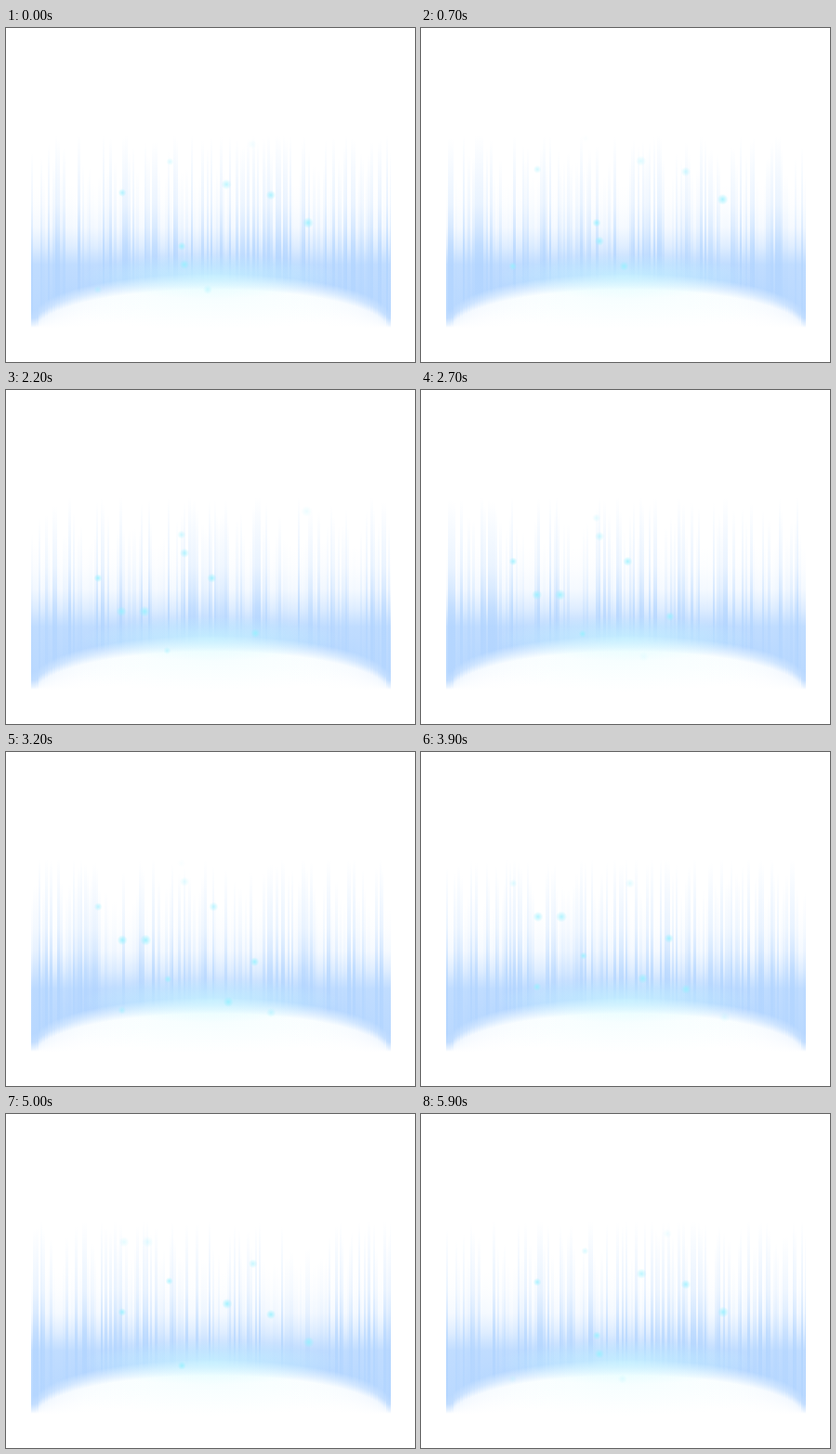
An HTML page with a canvas for the animation above (6 s loop, 440 by 360 pixels).

```html
<!DOCTYPE html>
<html lang="en">
<head>
<meta charset="utf-8">
<title>Light curtain</title>
<style>
  html, body { margin: 0; width: 100%; height: 100%; overflow: hidden; background: #fff; }
  canvas { display: block; }
</style>
</head>
<body>
<canvas id="stage" width="440" height="360"></canvas>
<script>
const ctx = document.getElementById('stage').getContext('2d');
const LOOP = 6, LEFT = 27, RIGHT = 414, MID = 220.5, BASE = 323, TAU = Math.PI * 2;
const CLIMB = 36, START_Y = 290, PASS_Y = 210;

let seed = 41;
const random = () => (seed = seed * 16807 % 2147483647) / 2147483647;

// A slow flicker that repeats with the loop
const flicker = () => ({ phase: random() * TAU, cycles: 1 + Math.floor(random() * 3) });
const level = (f, t) => 0.5 + 0.5 * Math.sin(TAU * f.cycles * t / LOOP + f.phase);

const rays = [];
for (let x = LEFT; x < RIGHT; ) {
  const width = Math.min(random() < 0.6 ? 2 : 3, RIGHT - x);
  rays.push({ x, width, flicker: flicker() });
  x += width;
}

// Sparks: time and x at which each one rises past PASS_Y
const sparks = [
  [0, 325], [0.7, 189], [1.25, 192], [2, 99], [2, 221], [3, 125],
  [3, 150], [3.65, 267], [4.17, 175], [4.85, 238], [5.1, 125], [5.17, 285]
].map(([time, x]) => ({ time, x, drift: random() * 4 - 1, size: 1.4 + random() * 0.8 }));

const floorAt = x => 325 - 45 * Math.sqrt(Math.max(0.02, 1 - ((x - MID) / 191) ** 2));

function drawRay({ x, width, flicker }, t) {
  const s = level(flicker, t) ** 2;
  const top = 170 - 55 * s, floor = floorAt(x);
  const edge = (Math.abs(x - MID) / 194) ** 4;
  const g = ctx.createLinearGradient(0, top, 0, BASE);
  const stop = (y, alpha) =>
    g.addColorStop((y - top) / (BASE - top), `rgba(130,186,255,${alpha})`);
  stop(top, 0);
  stop(190, 0.02 + 0.16 * s);
  stop(215, 0.08 + 0.26 * s);
  stop(235, 0.25 + 0.26 * s);
  stop(255, 0.5 + 0.1 * s);
  stop(floor - 15, 0.55 + 0.05 * s);
  stop(floor - 6, 0.25 + 0.25 * edge);
  stop(floor + 2, 0.15 * edge);
  stop(BASE, 0);
  ctx.fillStyle = g;
  ctx.fillRect(x, top, width, BASE - top);
}

function glow(x, y, rx, ry, color, alpha) {
  ctx.save();
  ctx.translate(x, y);
  ctx.scale(rx, ry);
  const g = ctx.createRadialGradient(0, 0, 0, 0, 0, 1);
  g.addColorStop(0, `rgba(${color},${alpha})`);
  g.addColorStop(1, `rgba(${color},0)`);
  ctx.fillStyle = g;
  ctx.fillRect(-1, -1, 2, 2);
  ctx.restore();
}

function drawSpark({ time, x, drift, size }, t) {
  const born = time - (START_Y - PASS_Y) / CLIMB;
  const age = (t - born + LOOP) % LOOP;
  const y = START_Y - CLIMB * age;
  const alpha = Math.min(1, age * 2, (y - 115) / 75);
  if (alpha <= 0) return;
  const px = x + drift * (PASS_Y - y) / CLIMB;
  glow(px, y, size * 2.8, size * 2.8, '150,240,255', 0.85 * alpha);
}

function frame(now) {
  const t = now / 1000 % LOOP;
  ctx.fillStyle = '#fff';
  ctx.fillRect(0, 0, 440, 360);
  glow(MID, 290, 190, 35, '225,252,255', 0.3);
  for (const ray of rays) drawRay(ray, t);
  glow(MID, 268, 140, 24, '205,252,255', 0.6);
  for (const spark of sparks) drawSpark(spark, t);
  requestAnimationFrame(frame);
}
requestAnimationFrame(frame);
</script>
</body>
</html>
```
